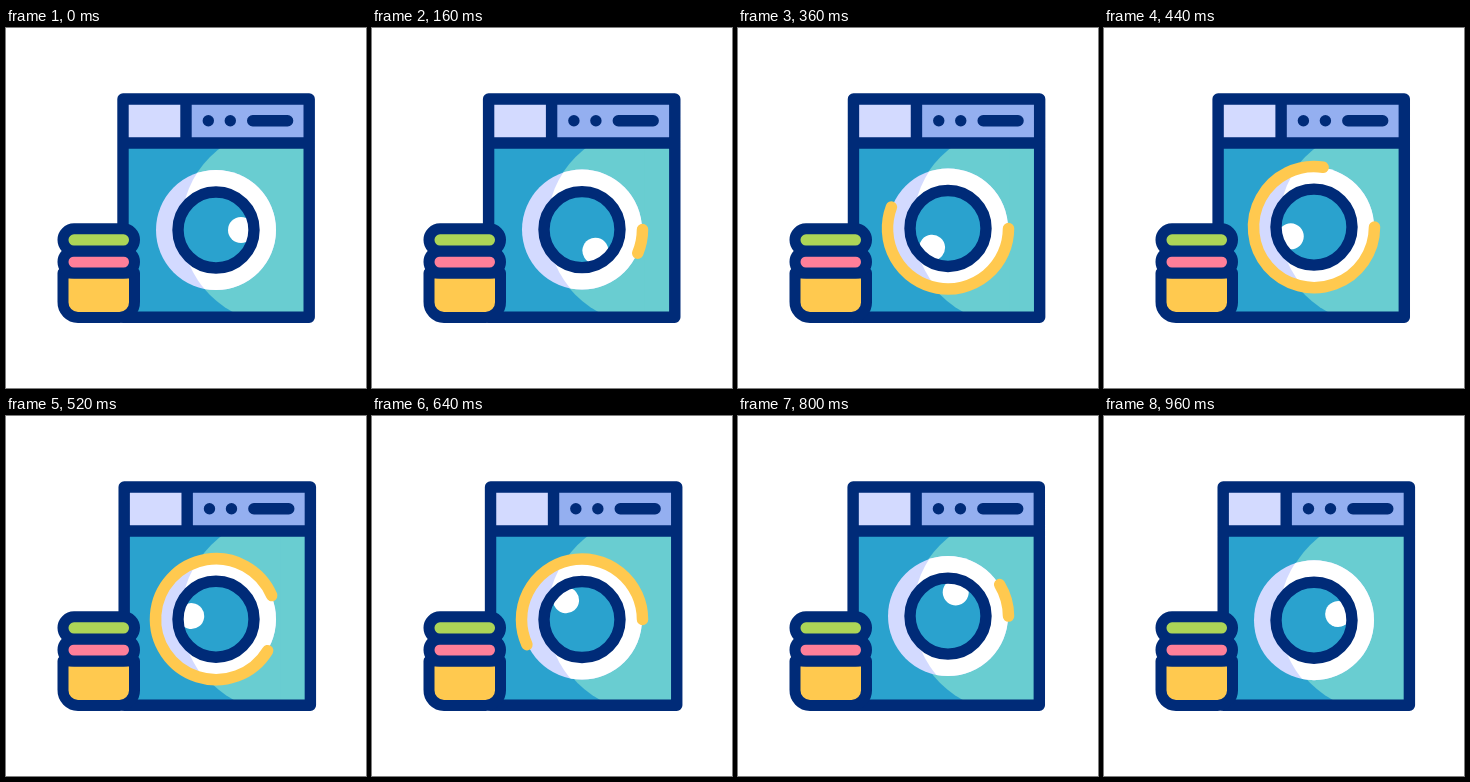
Write an HTML page that moves like this. It is 360 px wide and 360 px high and loops after 1 s.

```html
<!DOCTYPE html>
<html lang="en">
<head>
<meta charset="utf-8">
<title>Washing machine</title>
<style>
  html, body { margin: 0; width: 100%; height: 100%; overflow: hidden; background: #fff; }
  svg { display: block; width: 100%; height: 100%; }
  .line { fill: none; stroke: #002b78; stroke-width: 11.4; stroke-linecap: round; stroke-linejoin: round; }
  .dot { fill: #002b78; }
  .blue { fill: #2aa2ce; }
  .teal { fill: #69cdd1; }
  .lilac { fill: #d3daff; }
  .white { fill: #fff; }
  .cloth { stroke: #002b78; stroke-width: 11; stroke-linejoin: round; }
  #arc { fill: none; stroke: #ffc94f; stroke-width: 11.5; stroke-linecap: round; }
</style>
</head>
<body>
<svg viewBox="0 0 360 360">
  <defs>
    <clipPath id="bodyClip"><rect x="117" y="115" width="186" height="174"/></clipPath>
    <clipPath id="doorClip"><circle cx="210" cy="202" r="60"/></clipPath>
    <clipPath id="glassClip"><circle cx="210" cy="202" r="36"/></clipPath>
  </defs>

  <g id="body">
    <rect class="blue" x="117" y="115" width="186" height="174"/>
    <g clip-path="url(#bodyClip)"><circle class="teal" cx="273" cy="198" r="97.6"/><rect class="teal" x="273" y="115" width="30" height="174"/></g>
    <rect class="lilac" x="117" y="71" width="63" height="44"/>
    <rect x="180" y="71" width="123" height="44" fill="#94aff0"/>
    <path class="line" d="M117 71H303.2V289.2H117ZM117 115H303M180 71V115M246.7 92.7H281.6"/>
    <circle class="dot" cx="202.3" cy="92.7" r="5.7"/>
    <circle class="dot" cx="224.3" cy="92.7" r="5.7"/>
  </g>

  <g id="door">
    <circle class="lilac" cx="210" cy="202" r="60"/>
    <g clip-path="url(#doorClip)"><circle class="white" cx="273" cy="198" r="97.6"/></g>
    <circle class="blue" cx="210" cy="202" r="38"/>
    <g clip-path="url(#glassClip)"><circle id="bubble" class="white" cx="235" cy="202" r="13"/></g>
    <circle class="line" cx="210" cy="202" r="38"/>
    <path id="arc"/>
  </g>

  <g class="cloth">
    <path fill="#ffc94f" d="M57 245H128.5V274A15 15 0 0 1 113.5 289.4H72A15 15 0 0 1 57 274Z"/>
    <rect fill="#ff7f99" x="57" y="223" width="71.5" height="22" rx="11"/>
    <rect fill="#acd557" x="57" y="200.8" width="71.5" height="22.2" rx="11"/>
  </g>
</svg>
<script>
  const LOOP = 1000, STEP = 40, SHAKE = 3.2;
  const [body, door, bubble, arc] = ['body', 'door', 'bubble', 'arc'].map(id => document.getElementById(id));
  const start = performance.now();

  const ease = (t, from, to) => {
    const u = Math.min(1, Math.max(0, (t - from) / (to - from)));
    return u * u * (3 - 2 * u);
  };
  const onRing = (turn, r = 60.5) => {
    const a = turn * 2 * Math.PI;
    return `${210 + r * Math.cos(a)} ${202 + r * Math.sin(a)}`;
  };
  const sweep = (from, to) => {
    if (to - from < 0.001) return '';
    const mid = (from + to) / 2;
    const part = turn => `A60.5 60.5 0 0 1 ${onRing(turn)}`;
    return `M${onRing(from)}${part(mid)}${part(to)}`;
  };

  function draw(t) {
    const shake = -SHAKE * Math.sin(6 * Math.PI * t / LOOP);
    body.setAttribute('transform', `translate(${shake} 0)`);
    door.setAttribute('transform', `translate(0 ${shake})`);
    bubble.setAttribute('transform', `rotate(${360 * t / LOOP} 210 202)`);
    arc.setAttribute('d', sweep(ease(t, 440, 880), ease(t, 80, 600)));
  }

  // The motion advances at 25 steps per second.
  function tick() {
    const t = (performance.now() - start + 1) % LOOP;
    draw(Math.floor(t / STEP) * STEP);
    requestAnimationFrame(tick);
  }
  tick();
</script>
</body>
</html>
```
